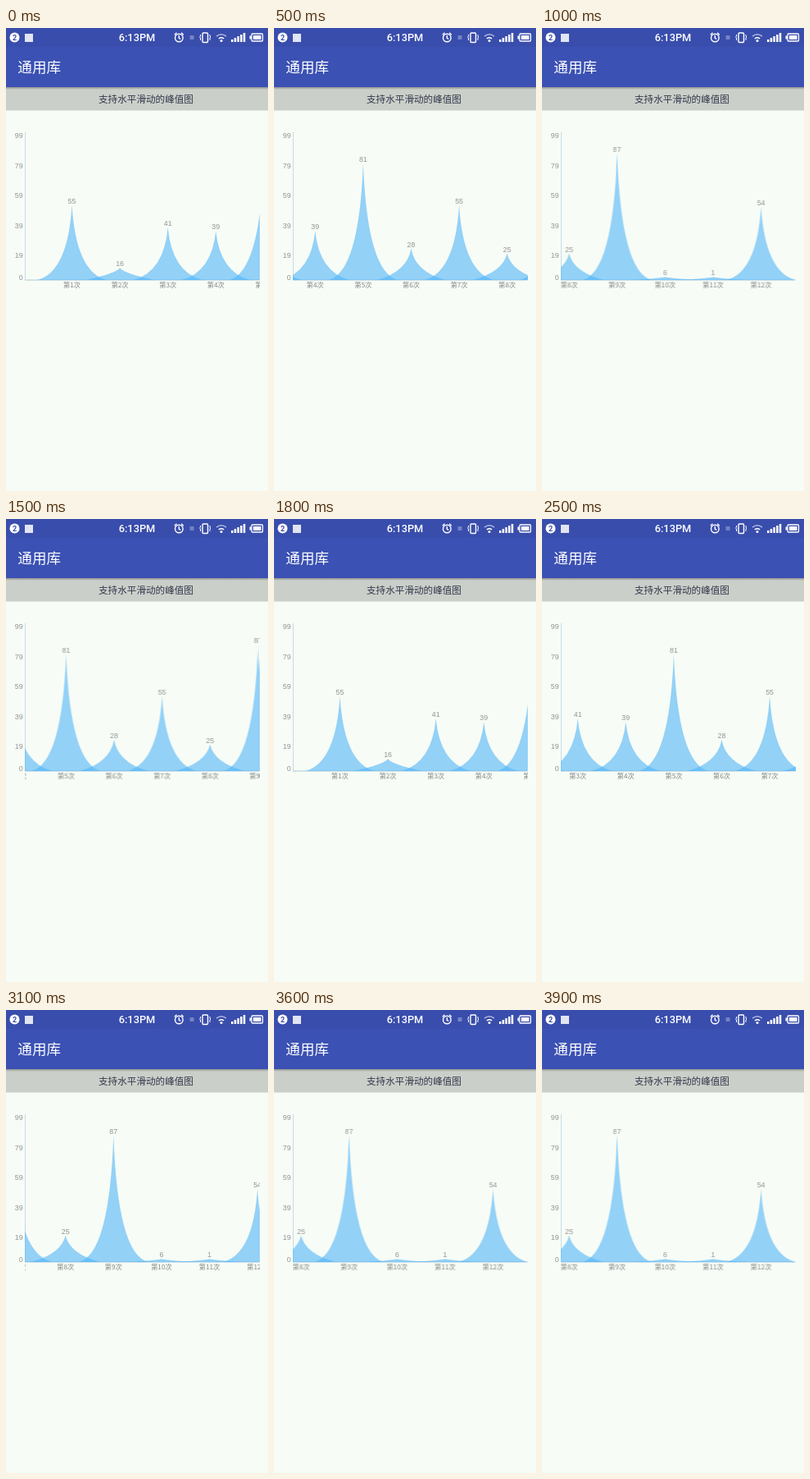
Animation of 320x564 px, one loop 4 s. Source, as an HTML page:

```html
<!DOCTYPE html>
<html lang="zh-CN">
<head>
<meta charset="utf-8">
<title>峰值图</title>
<style>
html, body { margin: 0; width: 100%; height: 100%; overflow: hidden; background: #f7fcf6; }
svg { display: block; width: 320px; height: 564px; }
text { font-family: "Noto Sans CJK SC", "Noto Sans CJK", sans-serif; }
.num { font: 8.9px "Liberation Sans", sans-serif; fill: #939595; }
.tick { text-anchor: end; }
.mid { text-anchor: middle; }
.cat { font-size: 8.2px; fill: #858787; }
.peak { fill: rgba(80, 180, 248, .6); }
#strip { animation: scroll 4s infinite; }
@keyframes scroll {
  0%    { transform: translateX(0);        animation-timing-function: steps(5); }
  12.5% { transform: translateX(-206px);   animation-timing-function: steps(5); }
  25%   { transform: translateX(-457.6px); animation-timing-function: steps(2); }
  30%   { transform: translateX(-457.6px); animation-timing-function: steps(3); }
  37.5% { transform: translateX(-241.5px); animation-timing-function: steps(3); }
  45%   { transform: translateX(0);        animation-timing-function: steps(3); }
  52.5% { transform: translateX(0);        animation-timing-function: steps(4); }
  62.5% { transform: translateX(-154px);   animation-timing-function: steps(6); }
  77.5% { transform: translateX(-418px);   animation-timing-function: steps(3); }
  85%, 100% { transform: translateX(-457.6px); }
}
</style>
</head>
<body>
<svg viewBox="0 0 320 564">
  <defs>
    <clipPath id="plot"><rect x="23" y="110" width="286.5" height="215"/></clipPath>
    <linearGradient id="shade" x2="0" y2="1">
      <stop stop-color="#000" stop-opacity=".3"/>
      <stop offset="1" stop-color="#000" stop-opacity="0"/>
    </linearGradient>
  </defs>
  <rect width="320" height="564" fill="#f7fcf6"/>

  <!-- title band and app bar -->
  <rect y="72" width="320" height="28.5" fill="#cacfc9"/>
  <text class="mid" x="171" y="91.2" font-size="11.6" fill="#34384c">支持水平滑动的峰值图</text>
  <rect width="320" height="72" fill="#3b51b3"/>
  <rect width="320" height="22.5" fill="#394dac"/>
  <rect y="72" width="320" height="3" fill="url(#shade)"/>
  <text x="14.3" y="54.2" font-size="17.6" fill="#fff">通用库</text>

  <!-- status bar -->
  <g fill="#fff">
    <circle cx="10.5" cy="11.6" r="6"/>
    <rect x="23" y="7" width="10" height="10" opacity=".85"/>
    <text class="mid" x="160" y="16.4" style="font:500 12.8px Roboto,sans-serif">6:13PM</text>
    <rect x="224.5" y="9" width="5" height="5" opacity=".3"/>
    <rect x="240" y="6" width="6.5" height="11.5" rx="1" fill="none" stroke="#fff" stroke-width="1.4"/>
    <path d="M237.5 8v2l-1 1 1 1v3M249 8v2l1 1-1 1v3" fill="none" stroke="#fff"/>
    <circle cx="263" cy="15.6" r="1.5"/>
    <path d="M259.8 13q3.2-2.6 6.4 0" fill="none" stroke="#fff" stroke-width="1.5"/>
    <path d="M257 10.2q6-5 12 0" fill="none" stroke="#fff" stroke-width="1.5" opacity=".6"/>
    <path d="M275 14h2.5v3H275zM278.7 12h2.5v5h-2.5zM282.4 10h2.5v7h-2.5zM286.1 8h2.5v9h-2.5zM289.8 6h2.5v11h-2.5z"/>
    <rect x="300" y="7" width="13.5" height="9" rx="1" fill="none" stroke="#fff" stroke-width="1.3"/>
    <path d="M302 9h9.5v5H302zM297.5 9.5h2v4h-2z"/>
  </g>
  <text class="mid" x="10.5" y="15" style="font:700 9px Roboto,sans-serif" fill="#394dac">2</text>
  <g fill="none" stroke="#fff" stroke-width="1.4">
    <circle cx="211.3" cy="12" r="4.8"/>
    <path d="M211.3 9v3.3l2 1M205.8 8.2l2.7-2.4M216.8 8.2l-2.7-2.4"/>
  </g>

  <!-- chart -->
  <path d="M23.5 127V307" stroke="#c4dbea"/>
  <path d="M23 307H309.5" stroke="#a9c9de"/>
  <g id="axis"></g>
  <g clip-path="url(#plot)"><g id="strip"></g></g>
</svg>
<script>
const values = [55, 16, 41, 39, 81, 28, 55, 25, 87, 6, 1, 54];
const base = 307, half = 42, first = 80.5, gap = 58.6;

const text = (cls, x, y, s) => `<text class="${cls}" x="${x}" y="${y}">${s}</text>`;

function peak(v, i) {
  const x = first + gap * i;
  const top = Math.min(323.6 - 1.96 * v, 303.3);
  const bend = base - Math.min(10, (base - top) * .55);
  return `<path class="peak" d="M${x - half} ${base}Q${x - 5} ${bend} ${x} ${top}` +
    `Q${x + 5} ${bend} ${x + half} ${base}Z"/>` +
    text("num mid", x, top - 2.1, v) +
    text("cat mid", x, 316.2, `第${i + 1}次`);
}

document.getElementById("strip").innerHTML = values.map(peak).join("");
document.getElementById("axis").innerHTML = [99, 79, 59, 39, 19, 0]
  .map((v, i) => text("num tick", 20.6, v ? 134 + 36.6 * i : 307.2, v)).join("");
</script>
</body>
</html>
```
